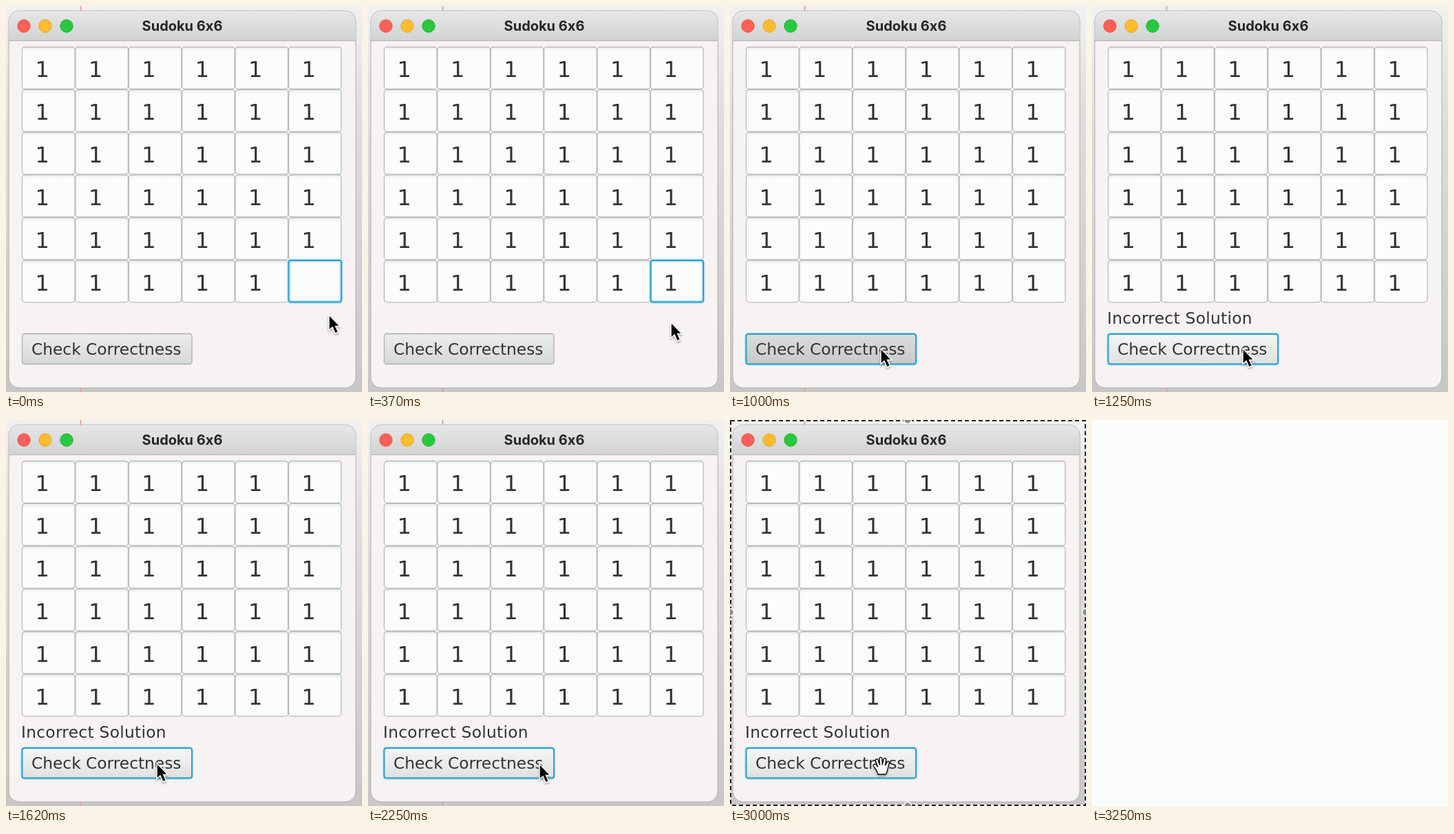
Animation of 517x560 px, one loop 4 s. Source, as an HTML page:

```html
<!DOCTYPE html>
<html lang="en">
<head>
<meta charset="utf-8">
<title>Sudoku 6x6</title>
<style>
  html, body { margin: 0; width: 517px; height: 560px; overflow: hidden; background: #fbfdfc; }
  svg { display: block; }
  text { font-family: "DejaVu Sans", sans-serif; fill: #333; }
  .title { font: 700 20px Inter, sans-serif; fill: #252525; text-anchor: middle; }
  .digit { font-size: 32px; }
  .label { font-size: 23.3px; }
  .ring { fill: none; stroke: #2f9fcb; stroke-width: 2; }
  .glow { fill: none; stroke: #b9e4f4; stroke-width: 5; }
</style>
</head>
<body>
<svg width="517" height="560" viewBox="0 0 517 560">
  <defs>
    <linearGradient id="bar" x2="0" y2="1"><stop stop-color="#e6e7e6"/><stop offset="1" stop-color="#d1d3d2"/></linearGradient>
    <linearGradient id="back" x2="0" y2="1"><stop stop-color="#f0f1f0"/><stop offset=".25" stop-color="#dedfde"/><stop offset="1" stop-color="#c6c7c6"/></linearGradient>
    <linearGradient id="field" x2="0" y2="1"><stop stop-color="#eceeed"/><stop offset=".1" stop-color="#fbfdfc"/></linearGradient>
    <linearGradient id="idle" x2="0" y2="1"><stop stop-color="#eceded"/><stop offset="1" stop-color="#d6d7d7"/></linearGradient>
    <linearGradient id="hover" x2="0" y2="1"><stop stop-color="#f5f6f6"/><stop offset="1" stop-color="#dfe1e0"/></linearGradient>
    <linearGradient id="pressed" x2="0" y2="1"><stop stop-color="#dcdddd"/><stop offset="1" stop-color="#c7c9c8"/></linearGradient>
    <filter id="shade" x="-50%" y="-50%" width="200%" height="200%"><feDropShadow dx="0" dy="2" stdDeviation="1.5" flood-opacity=".35"/></filter>
  </defs>
  <g id="scene">
    <rect width="517" height="560" fill="url(#back)"/>
    <path d="M108.5 0V8M108.5 553V560" stroke="#e6a497" stroke-width="2"/>
    <rect x="4" y="7" width="504" height="547" rx="15" fill="#f7f3f2" stroke="#adaead"/>
    <path d="M4.5 50V22a14.5 14.5 0 0 1 14.5-14.5H493a14.5 14.5 0 0 1 14.5 14.5V50Z" fill="url(#bar)"/>
    <path d="M4 50.5H508" stroke="#b3b5b4"/>
    <g stroke-width="1">
      <circle cx="26" cy="29" r="9.2" fill="#ff5f57" stroke="#e5514a"/>
      <circle cx="57" cy="29" r="9.2" fill="#febc2e" stroke="#e2a630"/>
      <circle cx="88" cy="29" r="9.2" fill="#28c840" stroke="#25ad38"/>
    </g>
    <text class="title" x="256" y="36">Sudoku 6x6</text>
    <g id="grid"></g>
    <g id="cellFocus">
      <rect class="glow" x="410.5" y="369" width="76.5" height="60.5" rx="4"/>
      <rect class="ring" x="410.5" y="369" width="76.5" height="60.5" rx="3"/>
    </g>
    <text id="message" class="label" x="22" y="461" letter-spacing=".3">Incorrect Solution</text>
    <rect id="buttonGlow" class="glow" x="23.5" y="476" width="246.5" height="43.5" rx="4"/>
    <rect id="button" x="23.5" y="475.5" width="246.5" height="44" rx="3.5" stroke="#adafae" stroke-width="1.3"/>
    <rect id="buttonRing" class="ring" x="23.5" y="476" width="246.5" height="43.5" rx="3"/>
    <text class="label" x="37" y="506">Check Correctness</text>
    <path id="arrow" filter="url(#shade)" d="M0 0V22.5L5 18L9 27L13.5 25L9.5 16.5H16Z" fill="#000" stroke="#fff" stroke-width="1.4"/>
    <g id="selection">
      <rect x="1" y="1" width="515" height="558" fill="none" stroke="#f4f4f4" stroke-width="2"/>
      <rect x="1" y="1" width="515" height="558" fill="none" stroke="#222" stroke-width="2" stroke-dasharray="6 4"/>
      <g fill="#8b8c8b" stroke="#fff" stroke-width="1.5">
        <circle cx="258" r="5.5"/><circle cx="258" cy="560" r="5.5"/>
        <circle cy="279" r="5.5"/><circle cx="517" cy="279" r="5.5"/>
      </g>
      <path filter="url(#shade)" fill="#fff" stroke="#111" stroke-width="1.4" stroke-linejoin="round"
        d="M215 514C214 508 210 505 208.500 502C207.500 499 211 498.500 213 501L214.500 503L211.500 495C210.500 491.500 214 490.500 215.300 494L217.500 500L217 492C217 488.500 220.500 488.500 220.800 492L221.300 500L223 492.500C223.800 489.500 227 490 226.500 493.500L225.500 501L228 496.500C229.500 494 232 495.500 231 498.500C229.500 504 229 509 226.500 514Z"/>
    </g>
  </g>
</svg>
<script>
const LOOP = 4000;
const TYPED = 120, HOVER = 870, PRESS = 1000, RELEASE = 1250, SELECT = 3000, BLANK = 3250;
// Pointer tip: [time, x, y], held until the next entry.
const pointer = [
  [0, 469, 448], [370, 440, 459], [500, 380, 474], [620, 312, 478],
  [750, 266, 470], [870, 228, 490], [1000, 219, 497], [1620, 219, 498],
  [2250, 249, 499], [2370, 234, 499], [2500, 219, 498]
];
const $ = id => document.getElementById(id);
const show = (id, on) => $(id).style.display = on ? "" : "none";

let cells = "";
for (let row = 0; row < 6; row++) {
  for (let col = 0; col < 6; col++) {
    const x = 23.5 + col * 77.4, y = 59.5 + row * 61.9;
    cells += `<rect x="${x}" y="${y}" width="76.5" height="60.8" rx="4" fill="url(#field)" stroke="#b9bbba" stroke-width="1.3"/>
      <text class="digit" x="${x + 19}" y="${y + 43.5}">1</text>`;
  }
}
$("grid").innerHTML = cells;
$("grid").lastElementChild.id = "lastDigit";

function draw(t) {
  const focused = t >= PRESS;
  const pressed = focused && t < RELEASE;
  show("scene", t < BLANK);
  show("lastDigit", t >= TYPED);
  show("cellFocus", !focused);
  show("buttonGlow", focused);
  show("buttonRing", focused);
  show("message", t >= RELEASE);
  show("arrow", t < SELECT);
  show("selection", t >= SELECT);
  $("button").setAttribute("fill", `url(#${pressed ? "pressed" : t >= HOVER ? "hover" : "idle"})`);
  const [, x, y] = pointer.findLast(([time]) => time <= t);
  $("arrow").setAttribute("transform", `translate(${x} ${y})`);
}

function tick() {
  draw(performance.now() % LOOP);
  requestAnimationFrame(tick);
}
tick();
</script>
</body>
</html>
```
